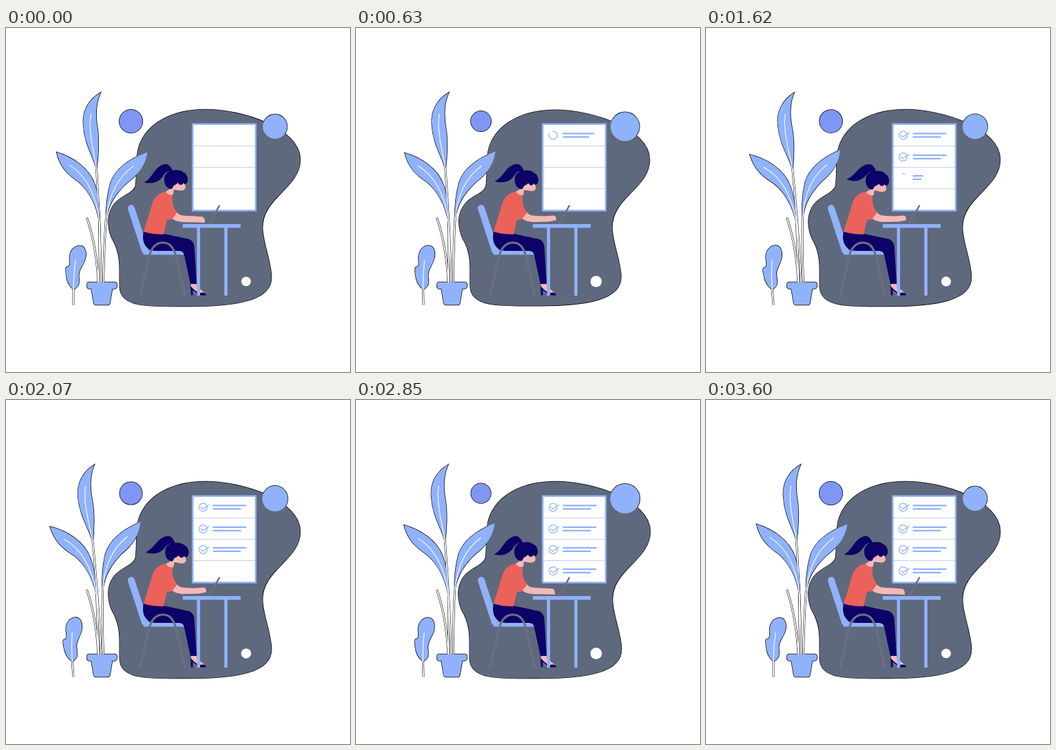
Write an HTML page with a canvas that moves like this. It is 500 px wide and 500 px high and loops after 3.66 s.

```html
<!DOCTYPE html>
<html lang="en">
<head>
<meta charset="utf-8">
<title>Working through a checklist</title>
<style>
html, body { margin: 0; width: 100%; height: 100%; overflow: hidden; background: #fff; }
canvas { display: block; width: 500px; height: 500px; }
</style>
</head>
<body>
<canvas id="stage" width="500" height="500"></canvas>
<script>
const ctx = document.getElementById('stage').getContext('2d');
const LOOP = 3660, STEP = 30, LAST = 3600;
const BLUE = '#90b2fb', NAVY = '#0c0268', SLATE = '#5f697d', CORAL = '#eb625b',
      SKIN = '#f5b8b6', GREY = '#6c7080', EDGE = '#05070f', VEIN = '#e6eeff';

const path = d => new Path2D(d);
const clamp = x => Math.min(1, Math.max(0, x));
const smooth = x => (1 - Math.cos(Math.PI * clamp(x))) / 2;
const wave = (t, period) => (1 - Math.cos(2 * Math.PI * t / period)) / 2;

const BLOB = path('M290 118C342 118 428 145 428 191C428 232 373 246 373 290C373 312 386 340 386 363C386 395 340 405 265 405C212 405 166 408 165 377C164 355 168 335 157 312C148 298 147 280 150 270C157 244 183 244 188 230C191 210 187 190 193 172C204 138 242 118 290 118Z');

// Each leaf swings about its own root by `sway` degrees.
const LEAVES = [
  { root: [138, 372], sway: 2,
    leaf: path('M137.5 94C120 104 111 121 112.5 140C114 170 128 188 131.5 206C134 190 136 162 132.500 143C129.500 124 131 108 137.5 94Z'),
    vein: path('M123.5 125C119 150 128 180 131.5 206'),
    stem: path('M131.5 204C134 250 138 310 138 372') },
  { root: [138, 372], sway: 3,
    leaf: path('M73.5 180.500C95 187 122 203 130 230C135 247 136 265 136 283C132 260 122 238 106 224C88 212 78 200 73.5 180.500Z'),
    vein: path('M93 200C116 214 131 240 136 283'),
    stem: path('M136 281C136 310 135 340 135 372') },
  { root: [140, 372], sway: 3.2,
    leaf: path('M205.5 180.500C183 189 160 202 152 225C147 243 145 262 145.5 278C149 255 160 240 176 225C194 212 203 198 205.5 180.500Z'),
    vein: path('M185 201C163 217 150 240 145.5 278'),
    stem: path('M145.5 276C143 310 142 340 141.5 372') },
  { root: [98, 402], sway: 4.7,
    leaf: path('M107 316.500C98 317 92.500 325 92.500 334C92.500 342 94 344 90 347.500C86.500 346 86.500 352 87.500 358C88 368 93 376 98 380C104 377 107 374 106 364C104 352 112 346 115 336C118 326 115 316.500 107 316.500Z'),
    vein: path('M101 338C99 352 98 365 98 380'),
    stem: path('M98 379L98 402.5') }
];
const SPROUT = path('M118 277C124 295 132 325 134 370');
const POT = path('M121.500 369.500H157.500Q161.500 369.500 161.500 374T157.500 379H154.500L151 399.500Q150.500 402.500 147 402.500H131.500Q128 402.500 127.500 399.500L124 379H121.500Q117.500 379 117.500 374T121.500 369.500Z');

const PANTS = path('M200 296L199 303C199 318 208 325 222 324L250 324C256 324 258 326 259 330L268 372L277 372L274 322C274 312 270 307 262 306L229 299Z');
const TORSO = path('M231 238C222 240 216 245 213 254L200 296C210 299 220 300 229 300L234 279L241 278L249 268C244 263 241 255 242 243Z');
const FOOT = path('M269 371L277 371L278 376L289 385L276 386L269 377Z');
const SHOE = path('M268 375L269 388.500L271.500 388.500L271.500 381C275 383 276 386 280 388.500L291 388.500C291 385 286 383.500 282 385C277 384 272 379 268 375Z');
const FACE = path('M240 221L259 221L261 232C260 236 256 237 251 236L244 235L243 242C239 244 234 241 232 238L238 234Z');
const HAIR = path('M230 220C230 210 238 206.500 246 206.500C253 206 257 208.500 258 210C262 211 265 217 264 223C262 228 259 228 258 225C256 229 252 229 250 225L246 228C242 229 243 234 240 234C233 233 230 227 230 220Z');
const TAIL = path('M243 209C239 200 235 197 231 198C216 200 213 219 200.500 224.500C216 228 224 222 229 214C232 209 236 206 240 210Z');
const CHAIR_LEGS = path('M195 388L208 332C212 317 219 312 228 312S243 317 247 332L260 388');

function fill(p, color) { ctx.fillStyle = color; ctx.fill(p); }

function stroke(p, color, width, cap = 'butt') {
  ctx.strokeStyle = color;
  ctx.lineWidth = width;
  ctx.lineCap = cap;
  ctx.stroke(p);
}

function line(x1, y1, x2, y2, color, width, cap) {
  const p = new Path2D();
  p.moveTo(x1, y1);
  p.lineTo(x2, y2);
  stroke(p, color, width, cap);
}

function disc(x, y, r) {
  const p = new Path2D();
  p.arc(x, y, r, 0, 2 * Math.PI);
  return p;
}

function turned([x, y], degrees, draw, scale = 1) {
  ctx.save();
  ctx.translate(x, y);
  ctx.rotate(degrees * Math.PI / 180);
  ctx.scale(scale, scale);
  ctx.translate(-x, -y);
  draw();
  ctx.restore();
}

function checkItem(y, t) {
  const ring = smooth((t - 340) / 380);
  const text = 1 - (1 - clamp((t - 375) / 430)) ** 3;
  const tick = smooth((t - 690) / 200);
  if (ring > 0) {
    const from = -0.55 * Math.PI;
    const p = new Path2D();
    p.arc(286.5, y, 5.9, from, from + ring * 2 * Math.PI);
    stroke(p, BLUE, 1.2);
  }
  if (text > 0) {
    line(301.5, y - 2.6, 301.5 + 47 * text, y - 2.6, BLUE, 2.3, 'round');
    line(301.5, y + 2.4, 301.5 + 39 * text, y + 2.4, BLUE, 2.3, 'round');
  }
  if (tick > 0) {
    ctx.setLineDash([16 * tick, 30]);
    stroke(path(`M283 ${y - 0.5}L286 ${y + 2.5}L295.5 ${y - 4}`), BLUE, 1.2);
    ctx.setLineDash([]);
  }
}

function drawWindow(t) {
  ctx.fillStyle = '#fff';
  ctx.fillRect(271, 139, 92, 127);
  for (const y of [171.5, 202.5, 233.5]) line(272, y, 363, y, '#c4d0f0', 1.2);
  [156, 187.5, 217.5, 248.5].forEach((y, i) => checkItem(y, t - 600 * i));
  ctx.strokeStyle = BLUE;
  ctx.lineWidth = 2.4;
  ctx.strokeRect(271.4, 139.6, 91.6, 125.8);
}

function drawWoman(t) {
  const nod = t < 3000 ? wave(t, 3000) : 0;
  const reach = clamp(nod * 2.6);

  line(182, 262, 202, 323, BLUE, 10, 'round');
  line(200, 326.3, 262, 326.3, BLUE, 6.6);
  fill(FOOT, SKIN);
  fill(SHOE, NAVY);
  fill(PANTS, NAVY);
  stroke(CHAIR_LEGS, GREY, 3.2, 'round');

  const hx = 289 + 2 * reach, hy = 283 - 3.5 * reach;
  fill(path(`M241 276L248 267C251 272 255 272.500 262 273L274 273.500L${hx - 3} ${274.5 - 2 * reach}C${hx} ${276 - 2 * reach} ${hx} ${hy - 3} ${hx} ${hy}L280 ${282.5 - reach}L256 282C248 281 243 279 241 276Z`), SKIN);
  fill(TORSO, CORAL);

  turned([240, 239], 4 * nod, () => {
    ctx.translate(0.8 * nod, 0.8 * nod);
    fill(FACE, SKIN);
    turned([242, 210], 4 * nod, () => {
      ctx.translate(2 * nod, 0);
      fill(TAIL, NAVY);
    });
    fill(HAIR, NAVY);
  });
}

function drawTable() {
  line(310.5, 257.5, 295.5, 284, GREY, 2.5);
  ctx.fillStyle = BLUE;
  ctx.fillRect(257, 285, 84, 5.4);
  ctx.fillRect(277.5, 290, 4.6, 99);
  ctx.fillRect(317.3, 290, 4.6, 99);
}

function render(t) {
  ctx.fillStyle = '#fff';
  ctx.fillRect(0, 0, 500, 500);

  const pulse = wave(t, 1800);
  const sway = wave(t, 3600);
  const blobScale = 0.997 - (t < 1800 ? 0.008 * pulse : 0);
  const leftDisc = disc(181.6, 135.6, 16.8 - 2.6 * pulse);
  const rightDisc = disc(391, 143.3, 17.7 + 4.1 * pulse);
  const inBlob = draw => turned([288, 262], 0, draw, blobScale);
  const eachLeaf = draw => LEAVES.forEach(l => turned(l.root, -l.sway * sway, () => draw(l)));
  const outline = p => stroke(p, EDGE, 1.5);

  // Dark rims go first so they only show against the white background.
  inBlob(() => outline(BLOB));
  [leftDisc, rightDisc, POT].forEach(outline);
  stroke(SPROUT, EDGE, 2.9, 'round');
  eachLeaf(l => {
    stroke(l.stem, EDGE, 2.9);
    outline(l.leaf);
  });

  inBlob(() => fill(BLOB, SLATE));
  drawWindow(t);
  fill(leftDisc, '#7f96f4');
  fill(rightDisc, BLUE);
  fill(disc(349, 368.4, 6.9 + 1.6 * pulse), '#fff');
  drawWoman(t);
  drawTable();

  stroke(SPROUT, '#fff', 1.8, 'round');
  eachLeaf(l => stroke(l.stem, '#fff', 1.8));
  eachLeaf(l => {
    fill(l.leaf, BLUE);
    stroke(l.vein, VEIN, 1.4, 'round');
  });
  fill(POT, BLUE);
}

const start = performance.now();
function tick() {
  const t = (performance.now() - start) % LOOP;
  render(Math.min(LAST, Math.floor(t / STEP) * STEP));
  requestAnimationFrame(tick);
}
tick();
</script>
</body>
</html>
```
